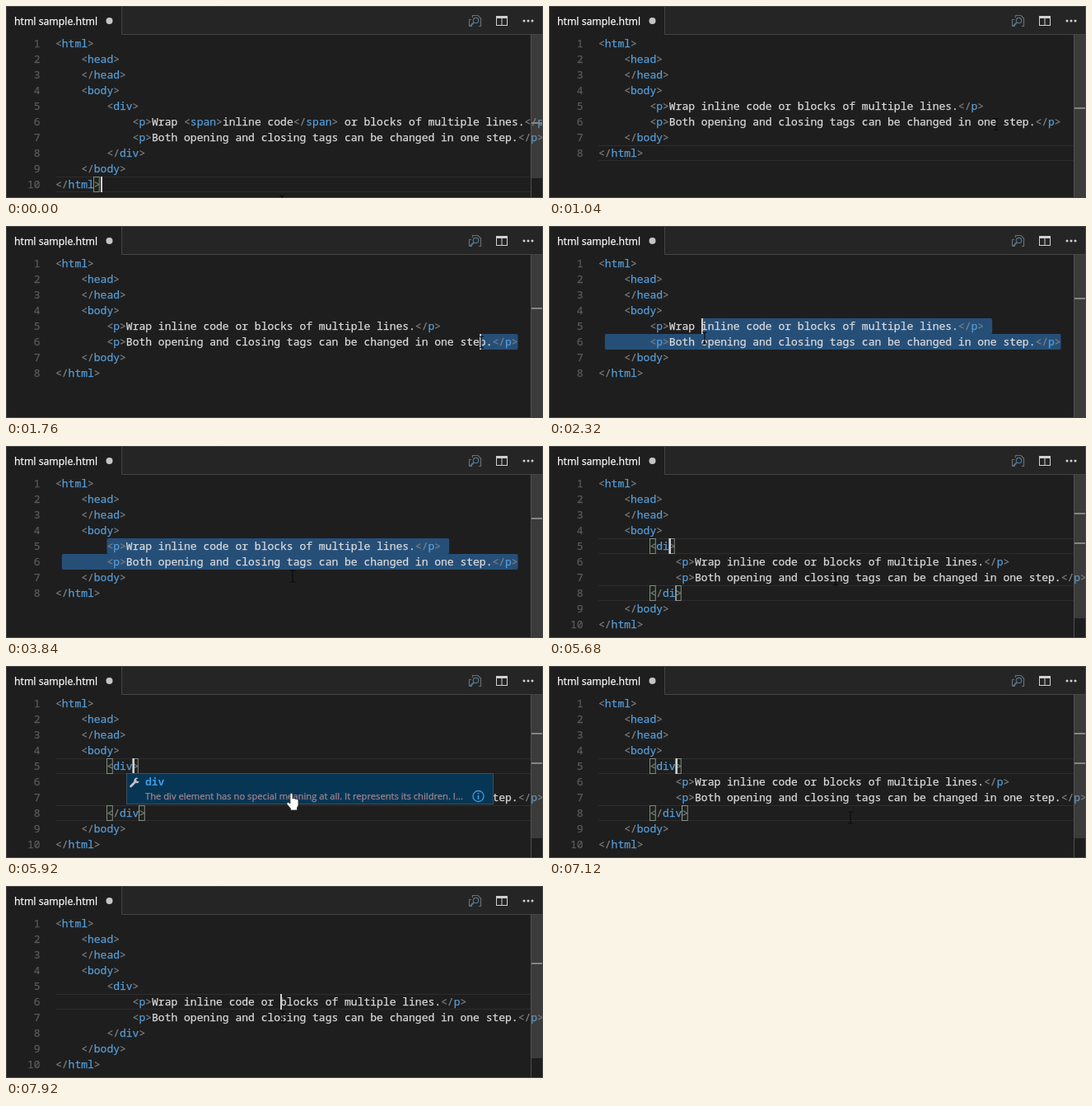
These frames come from a looping animation (652 by 233 pixels, 8000 ms). An HTML page:

```html
<!DOCTYPE html>
<html lang="en">
<head>
<meta charset="utf-8">
<title>Wrapping code in tags</title>
<style>
  html, body { margin: 0; width: 100%; height: 100%; overflow: hidden; background: #1e1e1e; }
  svg { display: block; width: 652px; height: 233px; }
  text, tspan { fill: currentColor; stroke: currentColor; stroke-width: .25px; }
  text { white-space: pre; color: #dadada; }
  .code, .num, .word { font: 13px "Noto Sans Mono", monospace; }
  .num { color: #5a5a5a; text-anchor: end; }
  .punct { color: #808080; }
  .tag { color: #569cd6; }
  .sel { fill: #264f78; }
  .match { fill: #3f4145; }
  .caret { fill: #d0d0d0; }
  .extra { fill: #9a9a9a; }
  .box { fill: #1b251b; stroke: #888; }
  .row { fill: none; stroke: #2d2d2d; }
  .mark { fill: #858585; }
  .ui { font: 12.3px "Open Sans", sans-serif; color: #fff; }
  .word { font-weight: bold; color: #3f9be0; stroke: none; }
  .note { font: 11.2px "Open Sans", sans-serif; color: #a3848c; }
</style>
</head>
<body>
<svg viewBox="0 0 652 233">
  <rect width="652" height="233" fill="#1e1e1e"/>
  <path d="M141 0H652V34H141Z" fill="#252526"/>
  <path d="M140.500 0V34.500H652" fill="none" stroke="#454545"/>
  <text class="ui" x="10" y="22.5">html sample.html</text>
  <circle cx="125.500" cy="18" r="4" fill="#c5c5c5"/>
  <g fill="none" stroke="#6c6c6c" stroke-width="1.200">
    <path d="M566 24.500H562.500V16.500H565M566.500 14V11.500H573L576.500 15V24.500H574"/>
    <g stroke="#4f7690">
      <circle cx="570.500" cy="17.500" r="3.200"/>
      <path d="M568 20L563.500 24.500" stroke-width="1.800"/>
    </g>
  </g>
  <path d="M595 12H609V24H595ZM596 15V23H601.500V15ZM602.500 15V23H608V15Z" fill="#d0d0d0" fill-rule="evenodd"/>
  <g fill="#d0d0d0"><circle cx="629" cy="18" r="1.500"/><circle cx="634" cy="18" r="1.500"/><circle cx="639" cy="18" r="1.500"/></g>

  <g id="editor"></g>

  <rect id="slider" x="638" y="35" width="14" fill="#797979" opacity=".32"/>
  <path d="M637.500 35V233" stroke="#505050"/>
  <g id="marks"></g>
  <g id="popup">
    <rect x="146.500" y="130.500" width="445" height="37" fill="#073655" stroke="#3c4f5c"/>
    <path d="M151.500 146L156.500 141" stroke="#c5c5c5" stroke-width="2.600" stroke-linecap="round"/>
    <path d="M160.500 136.300A3.200 3.200 0 1 0 161.700 140L158.700 139.800L158 137.500Z" fill="#c5c5c5"/>
    <text class="word" x="169" y="145">div</text>
    <text class="note" x="169" y="162">The div element has no special meaning at all. It represents its children. I...</text>
    <circle cx="573.500" cy="158" r="6.500" fill="none" stroke="#3f9be0" stroke-width="1.300"/>
    <path d="M573.500 154V155.600M573.500 157V162" stroke="#3f9be0" stroke-width="1.700"/>
  </g>
  <path d="M.5 .5H651.500V232.500H.5Z" fill="none" stroke="#454545"/>
  <path id="beam" d="M-3 -7H-1L0 -6L1 -7H3M0 -6V6M-3 7H-1L0 6L1 7H3" fill="none" stroke="#0c0c0c" stroke-width="1.200"/>
  <path id="hand" d="M345 155.500Q346.500 153 348 155.500V161L350 160.500L351.500 161.500L353.500 161.500L355 163V169L353.500 172V175H345.500V173L341 167.500Q340.500 165 343 165.500L345 167Z" fill="#fff" stroke="#222" stroke-width=".7"/>
</svg>
<script>
const LOOP = 8000, STEP = 80, LEFT = 60, TOP = 36, CHAR = 7.8, LINE = 19;
const $ = id => document.getElementById(id);
const colX = c => LEFT + c * CHAR;
const rowY = r => TOP + (r - 1) * LINE;

const first = '<p>Wrap inline code or blocks of multiple lines.</p>';
const second = '<p>Both opening and closing tags can be changed in one step.</p>';
const pad = (n, s) => ' '.repeat(n) + s;

function page(body) {
  return ['<html>', pad(4, '<head>'), pad(4, '</head>'), pad(4, '<body>'),
    ...body, pad(4, '</body>'), '</html>'];
}
const plain = page([pad(8, first), pad(8, second)]);
const wrapped = (tag, top = first) => page([pad(8, `<${tag}>`), pad(12, top),
  pad(12, second), pad(8, `</${tag}>`)]);
const spanned = first.replace('inline code', '<span>inline code</span>');

// Linear interpolation through [time, ...values] stops
function track(stops, t) {
  const i = stops.findIndex(s => s[0] > t);
  if (i < 0) return stops[stops.length - 1].slice(1);
  if (i === 0) return stops[0].slice(1);
  const a = stops[i - 1], b = stops[i], k = (t - a[0]) / (b[0] - a[0]);
  return a.slice(1).map((v, n) => v + (b[n + 1] - v) * k);
}
const drag = [[1520, 72], [1760, 66], [2320, 16], [2400, 14], [2640, 8]];
const mouse = [[0, 335, 237], [640, 335, 240], [800, 466, 144], [1280, 620, 143],
  [1520, 621, 141], [1760, 577, 141], [2320, 189, 136], [2640, 124, 136],
  [3120, 124, 136], [3280, 131, 138], [3680, 131, 138], [3840, 348, 158],
  [6720, 348, 164], [6880, 350, 164], [7120, 366, 184], [7440, 334, 144],
  [7600, 334, 142], [7920, 336, 159]];

const rect = (cls, x, y, w, h, r = 0) =>
  `<rect class="${cls}" x="${x}" y="${y}" width="${w}" height="${h}" rx="${r}"/>`;
const span = (cls, r, a, b) => rect(cls, colX(a), rowY(r), (b - a) * CHAR, LINE, 2);
const caret = ([r, c], i) => i
  ? rect('extra', Math.round(colX(c)), rowY(r), 1, LINE)
  : rect('caret', Math.round(colX(c)), rowY(r), 2, LINE);
const box = (r, c) => rect('box', Math.floor(colX(c)) + .5, rowY(r) + .5, CHAR - 1, LINE - 1);
const current = r => `<path class="row" d="M${LEFT} ${rowY(r) + .5}H637m0 ${LINE - 1}H${LEFT}"/>`;

const escape = s => s.replace(/</g, '&lt;').replace(/>/g, '&gt;');
const paint = s => s.replace(/(<\/?)(\w*)(>)|[^<]+/g, (all, open, name, close) => open
  ? `<tspan class="punct">${escape(open)}</tspan><tspan class="tag">${name}</tspan><tspan class="punct">${escape(close)}</tspan>`
  : all);

function text(lines) {
  return lines.map((s, i) => {
    const y = rowY(i + 1) + 14, indent = s.search(/\S/);
    return `<text class="num" x="41.500" y="${y}">${i + 1}</text>` +
      `<text class="code" x="${colX(indent)}" y="${y}">${paint(s.trim())}</text>`;
  }).join('');
}

function view(t) {
  if (t < 960) return {
    lines: wrapped('div', spanned), carets: t < 320 || t >= 800 ? [[10, 7]] : [],
    rows: [10], under: box(10, 6)
  };
  if (t < 1280) return { lines: plain, carets: [], rows: [8], under: '' };
  if (t < 1520) return { lines: plain, carets: [[6, 72]], rows: [6], under: '' };
  if (t < 4160) {
    const col = Math.round(track(drag, t)[0]), up = t >= 2160, row = up ? 5 : 6;
    return {
      lines: plain, carets: t < 3120 ? [[row, col]] : [], rows: [], at: [row],
      under: up ? span('sel', 5, col, 61.3) + span('sel', 6, 1, 72) : span('sel', 6, col, 72)
    };
  }
  if (t < 5600) {
    const lines = wrapped('p');
    let under = span('sel', 5, 9, 10) + span('sel', 8, 10, 11);
    if (t >= 4240) for (const r of [6, 7])
      [...lines[r - 1]].forEach((ch, c) => { if (ch === 'p') under += span('match', r, c, c + 1); });
    const on = t < 4720 || t >= 5120;
    return { lines, carets: on ? [[5, 10], [8, 11]] : [], rows: [], at: [5, 8], under };
  }
  if (t < 7600) {
    const n = Math.min(3, 1 + Math.floor((t - 5600) / 80));
    const on = t < 6480 || t >= 6960;
    return {
      lines: wrapped('div'.slice(0, n)), carets: on ? [[5, 9 + n], [8, 10 + n]] : [],
      rows: [5, 8], popup: t >= 5840 && t < 6080,
      under: box(5, 8) + box(5, 9 + n) + box(8, 8) + box(8, 10 + n)
    };
  }
  return { lines: wrapped('div'), carets: [[6, 35]], rows: [6], under: '' };
}

function draw(t) {
  const v = view(t), extra = v.lines.length - 8;
  $('editor').innerHTML = v.rows.map(current).join('') + v.under + text(v.lines) +
    v.carets.map(caret).join('');
  $('slider').setAttribute('height', 198 - extra * 12);
  $('marks').innerHTML = (v.at || v.rows)
    .map(r => rect('mark', 638, 27 + r * 12 - extra * 3, 14, 2)).join('');
  const [x, y] = track(mouse, t);
  $('beam').setAttribute('transform', `translate(${x} ${y})`);
  $('beam').style.display = v.popup ? 'none' : '';
  $('hand').style.display = $('popup').style.display = v.popup ? '' : 'none';
}

let last = -1;
const start = performance.now();
function tick() {
  const t = Math.floor((performance.now() - start) % LOOP / STEP) * STEP;
  if (t !== last) draw(last = t);
  requestAnimationFrame(tick);
}
tick();
</script>
</body>
</html>
```
